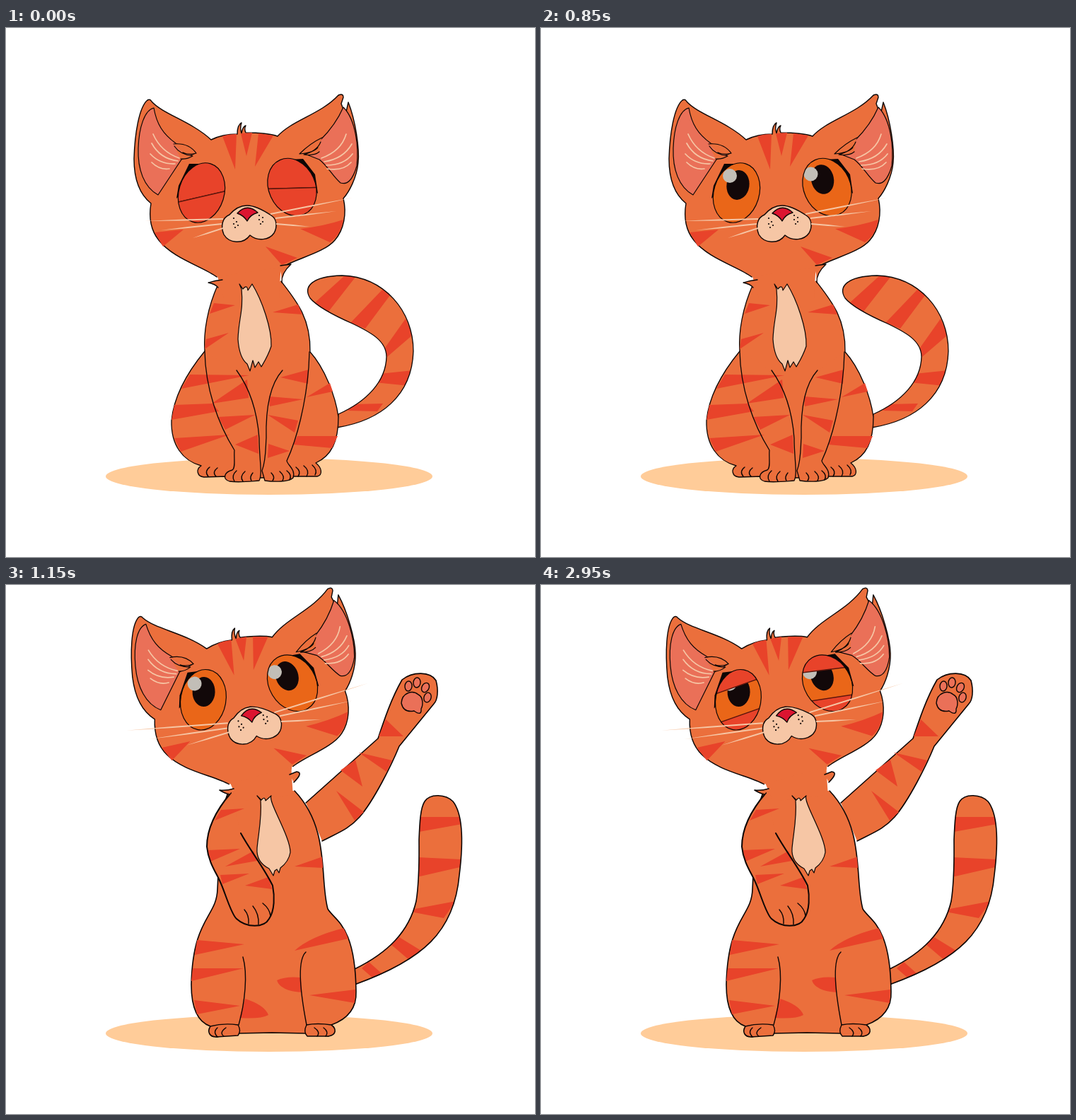
Recreate the animation shown at these times as an HTML page with a canvas. Size 748 by 748 pixels, loop 3 s.

```html
<!DOCTYPE html>
<html lang="en">
<head>
<meta charset="utf-8">
<title>Waving cat</title>
<style>
html, body { margin: 0; width: 100%; height: 100%; overflow: hidden; background: #fff; }
canvas { display: block; width: 100vw; height: 100vh; }
</style>
</head>
<body>
<canvas id="stage" width="748" height="748"></canvas>
<script>
const ctx = document.getElementById('stage').getContext('2d');
const FUR = '#eb6f3c', RED = '#e8432a', CREAM = '#f6c6a5', PINK = '#ea7058', INK = '#0d0605';
const LOOP = 3000, STEP = 50;

// Outlines for sitting, rising, reaching and waving.
const POSE_STOPS = [0, .38, .82, 1];
const ground = [
  'M141,634 A231,26 0 1 1 603,634 A231,26 0 1 1 141,634Z',
  'M150,632 A228,26 0 1 1 606,632 A228,26 0 1 1 150,632Z',
  'M157,631 A226,27 0 1 1 608,631 A226,27 0 1 1 157,631Z',
  'M141,634 A231,26 0 1 1 603,634 A231,26 0 1 1 141,634Z'
];
const tail = [
  'M470,546 C510,528 537,500 538,465 C538,442 515,430 490,418 C465,407 440,394 430,382 C420,366 432,351 475,350 C535,352 576,400 576,457 C574,520 530,555 468,565Z',
  'M474,543 C520,522 558,505 560,462 C560,440 540,410 527,390 C515,372 497,350 501,338 C506,324 518,320 530,320 C580,330 604,390 605,435 C600,490 570,545 472,563Z',
  'M477,543 C525,522 575,500 577,455 C576,425 565,395 564,370 C562,350 557,318 566,307 C572,299 582,298 590,303 C620,330 632,370 629,400 C622,490 590,545 475,562Z',
  'M493,543 C540,520 570,490 580,447 C585,415 584,380 584,360 C585,335 586,315 592,306 C600,294 622,296 632,306 C647,325 646,370 641,410 C634,490 590,530 493,565Z'
];
const tailStripes = [
  'M436,389 479,350 495,351 456,401Z M487,417 533,369 543,378 508,425Z M536,452 565,411 575,434 539,465Z M528,489 576,484 570,506 521,501Z M483,541 492,532 533,531 525,542Z',
  'M520,352 566,342 577,349 524,366Z M538,398 592,380 598,393 546,408Z M558,447 606,427 603,447 560,465Z M540,492 594,493 582,510 535,508Z M500,533 508,527 541,540 530,545Z',
  'M566,318 620,346 624,350 565,342Z M562,381 632,387 630,396 566,405Z M577,452 624,435 616,460 575,467Z M557,495 597,507 585,520 546,507Z M498,536 508,528 526,541 515,546Z',
  'M583,328 646,328 645,338 584,349Z M582,385 644,388 642,399 581,413Z M578,458 636,447 619,471 572,462Z M556,498 587,517 571,531 544,508Z M503,542 513,533 531,549 519,556Z'
];
const body = [
  'M300,362 C285,395 279,430 281,457 C262,480 238,515 234,555 C233,590 250,612 276,619 C268,624 270,634 280,635 L312,634 L361,636 L405,634 L440,634 C448,632 447,622 438,615 C460,605 470,585 470,550 C466,520 450,480 430,458 C431,410 410,385 389,358',
  'M306,328 C293,370 288,405 281,445 C262,480 242,520 243,575 C246,605 265,618 286,621 C276,626 278,635 287,635 L330,633 L367,622 L408,634 L442,631 C452,629 449,617 440,614 C465,602 473,585 473,565 C474,530 450,460 437,415 C420,390 418,350 400,328',
  'M313,302 C292,345 290,400 284,437 C262,475 250,520 250,570 C252,600 270,615 293,620 C284,625 284,634 292,635 L330,632 L372,621 L410,632 L445,630 C455,628 451,617 444,612 C465,600 475,585 475,562 C472,500 450,455 443,437 C442,370 430,330 406,300',
  'M316,290 C300,320 302,380 299,430 C298,470 264,470 262,565 C262,600 272,618 289,624 C284,632 288,639 297,639 L328,634 L376,633 L424,634 L456,638 C468,636 467,627 460,622 C482,614 496,600 495,575 C494,480 465,475 455,458 C443,415 459,345 408,291'
];
const leftArm = [
  'M281,457 C282,510 300,560 323,597 C322,608 325,622 320,625 C308,628 306,638 316,641 C330,643 345,641 358,640 C363,630 358,610 358,580 C355,540 345,510 326,484',
  'M291,390 C285,420 288,455 300,480 C318,510 322,530 322,545 C320,565 318,575 320,578 C335,588 355,590 372,582 C378,570 376,545 374,530 C368,490 350,465 326,420',
  'M291,384 C292,395 300,410 306,425 C312,440 318,450 328,470 C328,485 335,492 345,497 C365,505 385,500 392,485 C398,470 394,450 385,430 C370,400 350,375 324,358',
  'M318,294 C300,315 284,340 284,370 C286,392 298,408 303,420 C310,435 318,465 326,472 C340,485 365,485 372,472 C380,460 380,440 377,425 C365,400 345,375 332,351'
];
const rightArm = [
  'M429,458 L428,480 C424,530 412,580 397,612 C398,618 410,624 406,636 C400,642 380,642 366,640 L362,626 C368,610 367,590 368,580 C367,540 372,505 391,484',
  'M415,350 L440,380 C460,400 475,430 490,470 C495,490 505,505 500,515 C490,530 480,535 474,540 L462,500 C450,470 440,440 437,420 C430,410 415,400 415,395',
  'M416,318 L500,290 C535,275 560,250 575,215 C590,190 620,190 620,205 C620,225 620,280 620,290 L560,318 C530,335 500,350 480,362 C470,368 455,374 438,377',
  'M424,308 L526,217 C535,190 545,160 560,134 C575,122 600,122 608,135 C612,150 610,163 605,168 L556,228 C545,255 520,305 500,328 C485,345 470,350 447,362'
];
const chest = [
  'M330,362 L335,369 Q341,362 342,371 L348,362 C362,385 376,425 375,450 C370,465 365,472 361,479 L357,472 L352,480 L349,470 L345,485 L341,475 C332,468 329,455 328,440 C329,410 336,400 333,369Z',
  'M338,328 L345,333 Q349,326 350,333 L357,324 C364,345 382,400 381,425 C378,440 374,447 370,450 L366,449 L362,458 L358,450 L353,464 L348,452 C338,444 333,430 333,415 C335,385 342,365 342,335Z',
  'M343,304 L349,310 Q355,302 357,309 L365,302 C366,325 386,390 386,410 C386,420 384,426 380,430 L376,432 L372,430 L370,425 L366,428 L362,420 C352,410 342,390 340,375 C343,350 347,335 346,311Z',
  'M355,298 L361,304 Q366,298 367,305 L375,298 C370,306 402,355 402,378 C400,390 392,397 388,400 L386,407 L383,402 L380,404 L378,411 L372,401 C360,395 354,385 355,372 C357,350 362,330 360,304Z'
];
const neckTufts = [
  'M306,356 Q296,357 286,360 Q296,362 300,367 M388,336 L403,334 Q389,347 390,360',
  'M322,288 Q312,291 302,290 Q310,295 316,296 M401,268 Q411,264 421,265 Q407,279 408,291'
];

const sitStripes = 'M294,389 324,392 288,404Z M283,440 315,431 281,454Z M377,402 413,391 419,405Z M260,490 344,491 248,510Z M291,531 341,497 343,523Z M238,533 292,531 301,542 234,554Z M300,550 352,547 310,568Z M238,580 316,575 247,599Z M324,589 356,575 357,602Z M388,494 428,483 427,503Z M372,521 420,525 373,535Z M425,522 458,502 462,514Z M370,547 413,555 408,572Z M371,588 401,598 370,608Z M406,589 412,577 469,577 461,594Z';
const riseStripes = 'M262,494 Q290,480 328,467 Q300,495 256,508Z M252,545 Q300,512 349,518 Q305,535 253,563Z M255,585 Q300,567 357,569 L260,600Z M404,509 Q420,493 468,495 L469,509Z M391,570 L474,574 472,590 Q430,587 391,570Z M314,342 335,338 321,348Z M392,353 425,348 432,364Z M292,385 297,410 287,430Z';
const waveStripes = 'M270,502 337,508 267,523Z M264,542 336,542 262,560Z M266,587 331,595 270,607Z M338,585 Q366,594 371,608 Q360,614 330,612Z M408,517 Q430,497 478,485 L484,500Z M383,559 Q395,553 417,555 L418,576 Q388,574 383,559Z M429,580 494,572 493,591Z M408,398 448,384 448,400Z';
const leftArmStripes = 'M304,318 337,316 295,333Z M285,375 331,373 289,391Z M310,398 350,376 355,390Z M303,410 344,408 306,423Z M338,425 371,413 376,430Z';
const rightArmStripes = 'M527,214 537,190 562,214Z M499,237 546,248 538,264Z M473,262 494,247 504,285Z M467,291 506,321 493,333Z';

const clamp = v => Math.max(0, Math.min(1, v));

function mix(keys, q, stops = keys.length === 2 ? [0, 1] : POSE_STOPS) {
  let i = 0;
  while (i < stops.length - 2 && q > stops[i + 1]) i++;
  const k = (q - stops[i]) / (stops[i + 1] - stops[i]);
  const end = keys[i + 1].match(/-?\d+/g);
  let n = 0;
  return keys[i].replace(/-?\d+/g, a => +a + (end[n++] - a) * k);
}

function draw(d, fill, line, width = 1.4) {
  const path = d instanceof Path2D ? d : new Path2D(d);
  if (fill) { ctx.fillStyle = fill; ctx.fill(path); }
  if (line) { ctx.strokeStyle = line; ctx.lineWidth = width; ctx.stroke(path); }
}

function oval(x, y, rx, ry, turn, fill, line) {
  const path = new Path2D();
  path.ellipse(x, y, rx, ry, turn, 0, Math.PI * 2);
  draw(path, fill, line);
  return path;
}

function scoped(fn) { ctx.save(); fn(); ctx.restore(); }

function eye(e, lid) {
  draw(e.brow, INK);
  const path = oval(e.x, e.y, e.rx, e.ry, e.turn, '#ea6618');
  scoped(() => {
    ctx.clip(path);
    oval(...e.pupil, 16, 21, e.turn / 2, '#120809');
    oval(...e.glint, 10, 10, 0, '#c2beb7');
    if (!lid) return;
    const [left, right] = lid === 2 ? e.shut : e.upper;
    const x0 = e.x - 50, x1 = e.x + 50;
    draw(`M${x0},${left} L${x1},${right} L${x1},100 L${x0},100Z`, RED, '#5d160c');
    const [low0, low1] = lid === 2 ? e.shut : e.lower;
    draw(`M${x0},${low0} L${x1},${low1} L${x1},320 L${x0},320Z`, RED, '#5d160c');
  });
  draw(path, null, INK, 1.2);
}

const eyes = [
  { x: 276.5, y: 233, rx: 32, ry: 43, turn: .3, brow: 'M241,241 L244,223 L259,192 L292,192 L270,215Z',
    pupil: [278.5, 222], glint: [267, 209], upper: [225, 203], lower: [266, 244], shut: [250, 227] },
  { x: 404.5, y: 225, rx: 33, ry: 42, turn: -.42, brow: 'M386,191 L402,186 L420,185 L437,207 L441,234 L415,215Z',
    pupil: [398, 214], glint: [381.5, 206.5], upper: [206, 206], lower: [248, 245], shut: [228, 225] }
];

// Root, sitting tip and waving tip of each whisker.
const whiskers = [
  [307, 270, 196, 273, 163, 263], [305, 277, 219, 286, 194, 279], [307, 283, 264, 297, 245, 294],
  [374, 263, 490, 240, 511, 238], [381, 269, 467, 259, 486, 260], [382, 277, 430, 281, 438, 281]
];

const extension = q => clamp((q - .82) / .18);

function tiltHead(q) {
  ctx.translate(340.5 - 1.5 * q + 3 * extension(q), 229 - 78.5 * q);
  ctx.rotate(-.122 * q);
  ctx.translate(-340.5, -229);
}

function skull() {
  draw('M298,352 C280,338 236,326 216,300 C204,285 202,266 205,248 C190,236 181,215 181,185 C182,150 188,112 200,102 Q204,100 206,104 C222,122 262,132 290,158 C300,153 315,150 327,150 C327,143 329,136 333,134 C331,140 332,146 333,149 C334,143 336,139 339,138 C337,142 338,146 339,148 C355,148 372,149 384,153 C405,130 445,122 470,95 Q477,92 477,98 L474,107 L480,123 L484,105 C494,130 500,170 498,190 C496,212 485,232 477,241 C482,262 478,285 465,300 C450,318 410,326 391,338', FUR, INK);
  draw('M306,153 Q314,150 326,150 L324,200Z M332,149 348,148 340,181Z M357,149 378,152 352,196Z M210,289 251,285 222,309Z M477,271 Q450,280 416,284 L458,303 Q474,292 477,271Z M367,309 412,325 390,335Z', RED);

  draw('M215,236 C195,225 186,200 187,170 C188,140 196,116 209,113 C213,136 222,150 240,163 L268,177 L248,186Z', PINK, INK, 1.2);
  draw('M477,112 C495,130 499,170 496,195 C490,216 482,222 473,219 C462,210 455,195 443,186 L420,177 L445,158 Q466,137 477,112Z', PINK, INK, 1.2);
  draw('M237,164 Q258,162 269,177 Q258,180 250,176 M238,167 Q246,179 264,181 Q256,186 247,185 M447,155 Q430,163 415,178 Q436,176 441,169 M445,161 Q440,174 421,179 Q436,181 443,175', FUR, INK, 1.2);
  draw('M208,150 Q219,175 245,184 M206,163 Q218,185 243,188 M204,178 Q218,193 239,192 M206,190 Q217,201 231,199 M481,150 Q474,174 446,184 M489,164 Q477,185 450,189 M490,178 Q478,194 453,194 M488,190 Q476,203 454,199', null, CREAM, 1.7);
}

function head(q, lid) {
  const reach = extension(q);
  tiltHead(q);
  scoped(() => { ctx.translate(0, 4 * reach); skull(); });
  eyes.forEach(e => eye(e, lid));

  draw('M341,251 C330,251 322,257 316,264 C306,268 303,280 308,292 C315,304 335,307 345,293 C356,302 372,300 379,290 C384,281 383,270 375,265 C366,259 353,251 341,251Z', CREAM, INK);
  draw('M327,262 Q341,247 356,261 Q345,264 341,273 Q336,265 327,262Z', '#dc1430', INK);
  for (const [x, y] of [[322, 269], [326, 274], [322, 277], [328, 279], [324, 282], [358, 265], [363, 268], [358, 271], [363, 274], [360, 277]])
    oval(x, y, 1.1, 1.1, 0, INK);

  for (const [x, y, ax, ay, bx, by] of whiskers) {
    const tx = ax + (bx - ax) * reach, ty = ay + (by - ay) * reach;
    const cx = (x + tx) / 2, cy = (y + ty) / 2;
    draw(`M${x},${y - 1} Q${cx},${cy - 1.5} ${tx},${ty} Q${cx},${cy + 1.5} ${x},${y + 1}Z`, CREAM);
  }
}

function reachingArm(q) {
  const d = mix(rightArm, q);
  if (q === 1) {
    draw(d, FUR, INK, 1.6);
    draw(rightArmStripes, RED);
    for (const [x, y, turn] of [[569, 143, .1], [581, 138, .1], [593, 145, .5], [596, 159, .3]])
      oval(x, y, 5, 7, turn, PINK, INK);
    draw('M559,167 C560,152 575,148 583,155 C590,158 590,170 587,175 Q588,186 577,178 Q562,181 559,167Z', PINK, INK);
    return;
  }
  const rising = q < .7;
  const fade = rising ? ctx.createLinearGradient(425, 470, 505, 430) : ctx.createLinearGradient(500, 310, 615, 240);
  fade.addColorStop(0, FUR);
  fade.addColorStop(1, 'rgba(235,111,60,.1)');
  draw(d, fade);
  for (let i = 0; i < 9; i++) scoped(() => {
    ctx.globalAlpha = rising ? .08 : .05;
    ctx.translate(i * (rising ? 6 : 0), i * (rising ? -5 : 2) - (rising ? 0 : 8));
    draw(d, rising ? FUR : null, '#5d4238', 1);
  });
  scoped(() => {
    ctx.globalAlpha = .7;
    draw(rising ? 'M455,390 465,335 480,340Z M469,410 490,355 499,364Z M488,422 528,371 539,378Z'
                : 'M445,318 472,310 480,352Z M498,300 515,292 523,335Z M530,270 540,262 541,300Z', RED);
  });
}

function toes(q) {
  if (!q) {
    draw('M288,621 q-8,6 -2,13 M299,622 q-8,6 -2,12 M410,621 q8,6 3,13 M421,619 q9,7 4,15 M433,618 q8,7 4,14 M326,626 q-8,7 -3,15 M338,627 q-8,7 -3,14 M349,629 q-5,6 -2,11 M375,629 q6,6 2,11 M387,627 q8,7 4,13 M397,626 q8,6 4,13', null, INK);
  } else if (q < 1) {
    scoped(() => {
      ctx.translate(7 * (q - .82) / .44, 0);
      draw('M297,622 q-8,6 -2,12 M307,622 q-8,6 -2,12 M419,618 q7,7 3,13 M429,617 q8,7 4,13 M438,615 q8,7 4,13', null, INK);
    });
    draw(q < .6 ? 'M342,585 Q338,610 346,630 M424,519 C395,560 380,595 389,627'
                : 'M335,527 C340,560 338,590 331,632 M424,519 C405,550 405,590 413,632', null, INK, 1.2);
  } else {
    draw('M289,624 Q308,619 328,622 Q333,630 328,637 L297,639 M460,622 Q440,619 425,622 Q420,632 426,638 L456,638', FUR, INK);
    draw('M299,626 q-7,6 0,13 M311,626 q-10,7 -3,12 M436,626 q9,6 4,12 M449,626 q8,6 3,12 M335,526 C342,550 338,590 329,622 M424,519 C412,530 415,570 425,622', null, INK);
  }
}

function lidAt(t) {
  for (const start of [-50, 700, 1500, 2950]) {
    const n = (t - start) / STEP;
    if (n === 1) return 2;
    if (n === 0 || n === 2) return 1;
  }
  return 0;
}

function render(t) {
  const q = clamp((t - 864) / 227);
  const moving = q > 0 && q < 1;
  const width = q === 1 ? 1.6 : 1.3;
  ctx.clearRect(0, 0, 748, 748);
  ctx.lineJoin = ctx.lineCap = 'round';

  draw(mix(ground, q), '#ffcc99');
  const tailPath = new Path2D(mix(tail, q));
  draw(tailPath, FUR);
  scoped(() => { ctx.clip(tailPath); draw(mix(tailStripes, q), RED); });
  draw(tailPath, null, INK, width);

  if (q) reachingArm(q);
  const torso = new Path2D(mix(body, q));
  draw(torso, FUR, INK, width);
  scoped(() => {
    tiltHead(q);
    draw('M298,348 L391,335 L388,348 L386,382 L308,382Z', FUR);
  });
  scoped(() => {
    ctx.clip(torso);
    if (q) draw(q < 1 ? riseStripes : waveStripes, RED);
  });
  if (moving && q > .6)
    draw('M416,319 L450,313 L455,372 L438,376 L420,350Z', FUR);

  if (!q) {
    draw(leftArm[0], FUR);
    draw(rightArm[0], FUR);
    draw(sitStripes, RED);
    draw(leftArm[0], null, INK, width);
    draw(rightArm[0], null, INK, width);
  }
  toes(q);
  draw(mix(chest, q), CREAM, INK, 1.2);

  if (moving) {
    const arm = mix(leftArm, q);
    draw(arm, FUR);
    scoped(() => {
      ctx.globalAlpha = .5;
      draw(q < .6 ? 'M290,455 340,440 300,475Z M312,500 355,480 362,492Z M330,525 368,510 368,535Z'
                  : 'M293,392 345,378 302,405Z M305,430 348,416 312,441Z M350,440 388,432 388,448Z', RED);
      ctx.globalAlpha = .22;
      draw(arm, null, '#5c2415', 6);
      draw(arm, null, '#5c2415', 2);
    });
    scoped(() => {
      ctx.globalAlpha = .4;
      const y = q < .6 ? 545 : 467;
      const x = q < .6 ? 338 : 357;
      draw(`M${x},${y} q-3,20 5,32 M${x + 20},${y - 5} q-3,18 6,32`, null, '#5c2415', 3);
    });
  } else if (q === 1) {
    draw(leftArm[3], FUR);
    draw(leftArmStripes, RED);
    draw(leftArm[3], null, INK, 2);
    draw('M337,459 Q344,467 343,479 M349,454 Q358,465 357,480 M363,450 Q373,458 374,468', null, INK);
  }

  scoped(() => {
    if (moving && q < .7) ctx.filter = 'blur(1.5px)';
    head(q, lidAt(t));
  });
  draw(mix(neckTufts, q), FUR, INK, width);
}

let shown = -1;
function tick() {
  const t = Math.floor(performance.now() % LOOP / STEP) * STEP;
  if (t !== shown) render(shown = t);
  requestAnimationFrame(tick);
}
tick();
</script>
</body>
</html>
```
